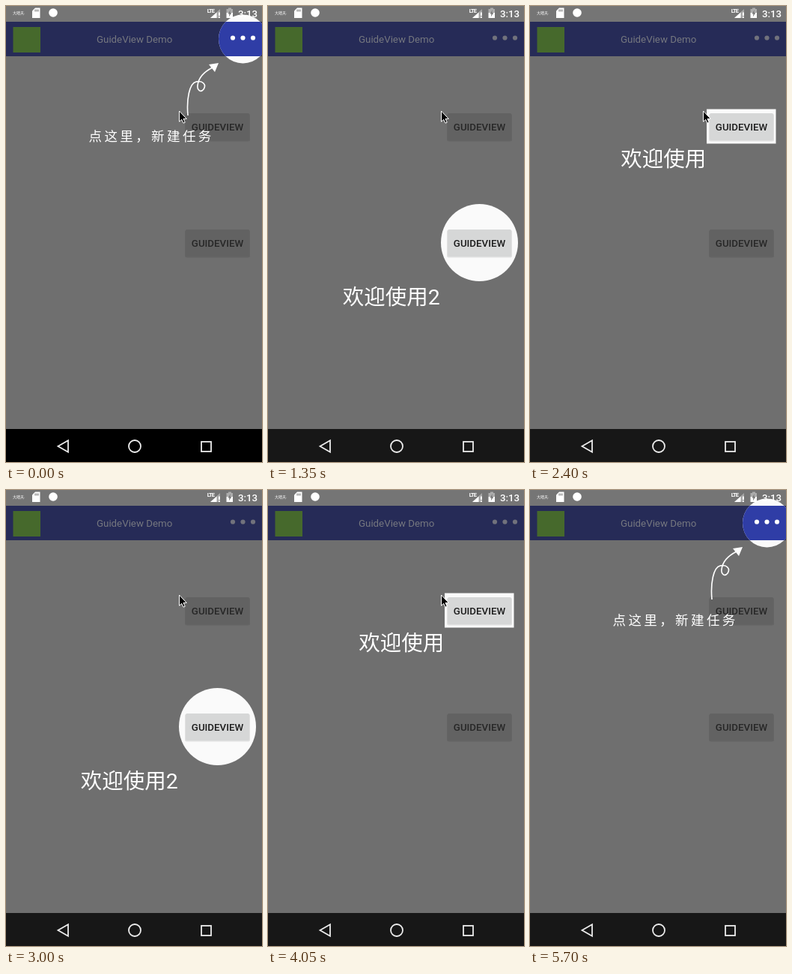
An HTML page that plays this animation: 342 px wide and 608 px high, repeating every 6890 ms.

```html
<!DOCTYPE html>
<html lang="en">
<head>
<meta charset="utf-8">
<title>GuideView Demo</title>
<style>
html, body { margin: 0; height: 100%; overflow: hidden; background: #6f6f6f; }
svg {
  display: block; width: 342px; height: 608px;
  font-family: Roboto, "Noto Sans CJK SC", "Noto Sans CJK", sans-serif;
  --dot: #71727c;
}
svg.menu { --dot: #fff; }
.label { font-size: 13.3px; font-weight: 500; text-anchor: middle; }
.caption { font-size: 28.5px; fill: #fff; }
.hand { font-size: 17.5px; font-weight: 500; letter-spacing: 3.4px; fill: #fff; }
.dim { --face: #626262; --ink: #272727; }
.lit { --face: #d6d7d7; --ink: #1c1c1c; }
[hidden] { display: none; }
</style>
</head>
<body>
<svg id="stage" viewBox="0 0 342 608">
  <defs>
    <g id="button">
      <rect x="239" y="143.5" width="87" height="37" rx="2.5" opacity=".1"/>
      <rect x="240" y="143" width="85" height="36" rx="2" fill="var(--face)"/>
      <text class="label" x="282.5" y="165.7" fill="var(--ink)">GUIDEVIEW</text>
    </g>
    <clipPath id="hole"><circle cx="316.5" cy="44" r="32.5"/></clipPath>
  </defs>

  <rect width="342" height="608" fill="#6f6f6f"/>
  <rect width="342" height="21" fill="#757575"/>
  <rect y="21" width="342" height="46" fill="#262b57"/>
  <rect x="9.5" y="28" width="36.5" height="34" fill="#46692c"/>
  <text x="121" y="49" font-size="13.3" fill="#75777f">GuideView Demo</text>
  <use href="#button" class="dim"/>
  <use href="#button" class="dim" y="155"/>

  <g id="menu" hidden>
    <g clip-path="url(#hole)">
      <rect x="284" y="11" width="58" height="66" fill="#fafafa"/>
      <rect x="284" y="21" width="58" height="46" fill="#2f3da6"/>
    </g>
    <path d="M243 146C241 124 245 103 254 101C263 99 268 105 264 111C260 116 255 112 256 106C257 96 264 88 276 82"
      fill="none" stroke="#fff" stroke-width="1.6"/>
    <path d="M284 76L271 78L279 88Z" fill="#fff"/>
    <text class="hand" x="110.5" y="180.3">点这里，新建任务</text>
  </g>
  <g id="box" hidden>
    <rect x="236" y="137.5" width="92.5" height="46" fill="#fafafa"/>
    <use href="#button" class="lit"/>
    <text class="caption" x="121.3" y="214.3">欢迎使用</text>
  </g>
  <g id="circle" hidden>
    <circle cx="282.5" cy="315.5" r="51.5" fill="#fafafa"/>
    <use href="#button" class="lit" y="155"/>
    <text class="caption" x="99.8" y="397.7">欢迎使用2</text>
  </g>

  <g fill="var(--dot)">
    <circle cx="303" cy="42.5" r="3.1"/>
    <circle cx="316.5" cy="42.5" r="3.1"/>
    <circle cx="330" cy="42.5" r="3.1"/>
  </g>

  <g fill="#fff">
    <text x="9" y="11.3" font-size="5">大晴天.</text>
    <path d="M39 2.5H45.5V16H35V6.5Z"/>
    <path d="M39 4.5V7.5M41 4.5V7.5M43 4.5V7.5" stroke="#757575"/>
    <circle cx="63" cy="9" r="5.8"/>
    <text x="268.7" y="9" font-size="7.5" font-weight="700" letter-spacing="-.9">LTE</text>
    <path d="M286 4V16H273Z" opacity=".35"/>
    <path d="M281.5 8.5V16H273Z"/>
    <path d="M284 8.5h1.8v4.5h-1.8zM284 14.2h1.8V16h-1.8z"/>
    <path d="M294.5 4H297V2.5H301V4H303V9H294.5Z" opacity=".4"/>
    <path d="M294.5 9H303V16H294.5Z"/>
    <path d="M300 5L296.5 10.5H298.5L297.8 14.5L301.3 9H299.2Z" fill="#757575"/>
    <text class="label" x="323" y="14.5">3:13</text>
  </g>

  <rect id="nav" y="564" width="342" height="44"/>
  <g fill="none" stroke="#ececec" stroke-width="1.8">
    <path d="M69.5 587L83 579.2V594.8Z"/>
    <circle cx="172" cy="587" r="8"/>
    <rect x="261" y="581" width="13" height="13"/>
  </g>

  <path id="cursor" d="M1.5 1V15.2L4.7 12.3L7 17.2L9.2 16.2L7 11.4H11.3Z" stroke="#fff"/>
</svg>
<script>
const LOOP = 6890;
// time, scene, caption shown
const scenes = [
  [0, "menu"], [450, "box", false], [750, "box", true],
  [1200, "circle", false], [1350, "circle", true], [1800, "menu"],
  [2400, "box", true], [3000, "circle", true], [3450, "menu"],
  [4050, "box", true], [4200, "circle", true], [4500, "menu"]
];
// time, x, y; no position means off stage
const moves = [
  [0, 230, 139], [4500, 230, 162], [4650, 318, 401], [4800],
  [4950, 337, 523], [5100, 327, 548], [5250, 317, 576],
  [5400, 313, 597], [5550, 313, 603], [5700]
];
const get = id => document.getElementById(id);
const at = (list, t) => list.findLast(step => step[0] <= t);
const show = (el, on) => el.toggleAttribute("hidden", !on);

function draw(now) {
  const t = now % LOOP;
  const [, scene, caption] = at(scenes, t);
  get("stage").classList.toggle("menu", scene === "menu");
  get("nav").setAttribute("fill", t < 450 ? "#000" : "#171717");
  for (const id of ["menu", "box", "circle"]) {
    show(get(id), id === scene);
    const text = get(id).querySelector(".caption");
    if (text) show(text, caption);
  }
  const [, x, y] = at(moves, t);
  show(get("cursor"), x !== undefined);
  if (x !== undefined) get("cursor").setAttribute("transform", `translate(${x} ${y})`);
}

const start = performance.now();
function tick() {
  draw(performance.now() - start);
  requestAnimationFrame(tick);
}
tick();
</script>
</body>
</html>
```
